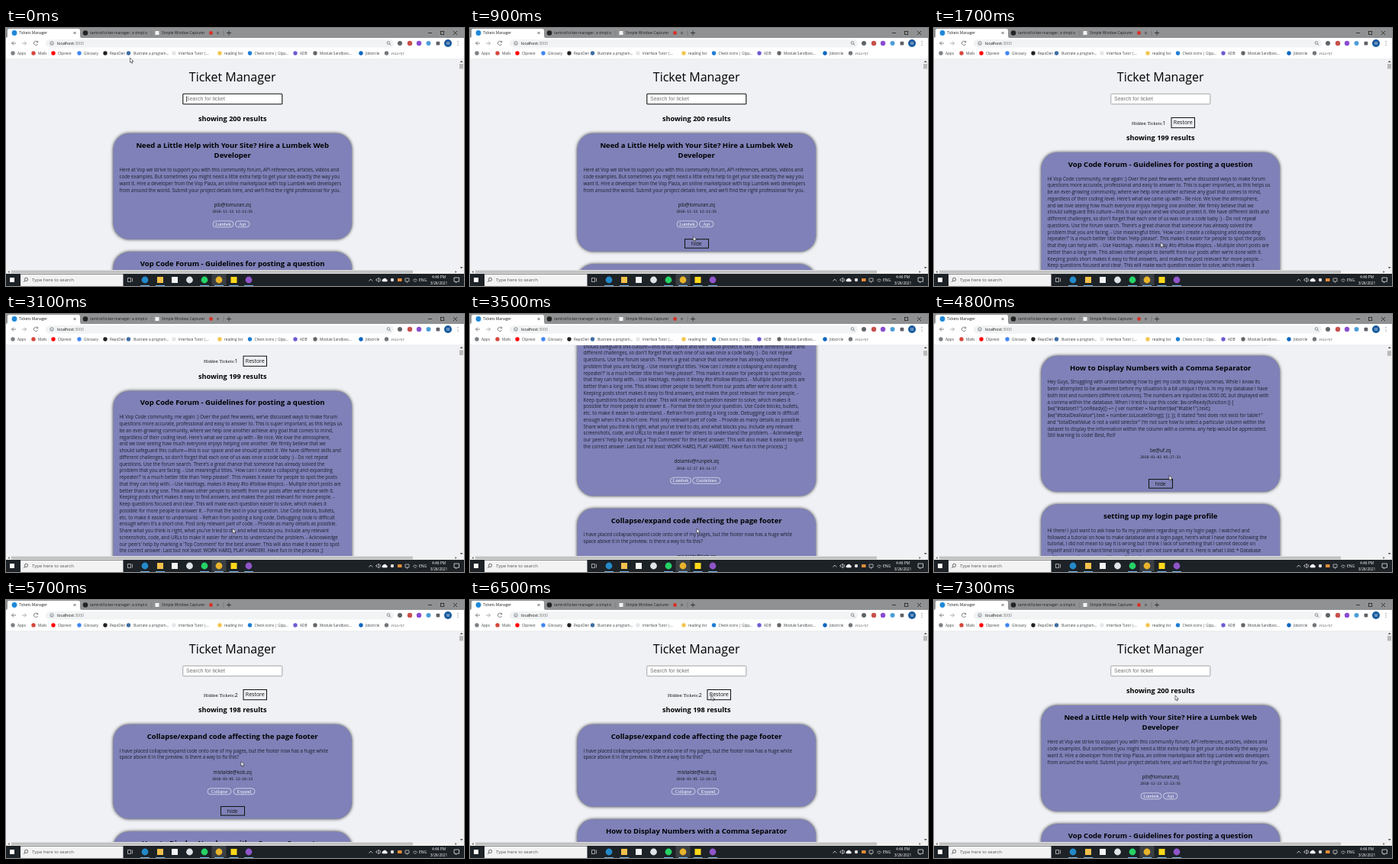
An HTML page that plays this animation: 600 px wide and 338 px high, repeating every 7.4 s.

```html
<!DOCTYPE html>
<html lang="en">
<head>
<meta charset="utf-8">
<title>Ticket Manager</title>
<style>
html, body { margin: 0; width: 100%; height: 100%; overflow: hidden; background: #eff1f5; }
svg { display: block; }
text { white-space: pre; font-family: "Open Sans", "Noto Sans", sans-serif; }
.bold { font-weight: 700; }
.serif { font-family: "Liberation Serif", serif; }
.mono { font-family: "DejaVu Sans Mono", monospace; }
.arial { font-family: "Liberation Sans", sans-serif; }
.hebrew { font-family: "DejaVu Sans", sans-serif; }
.card > rect:first-child { filter: drop-shadow(0 0 2px #333); }
</style>
</head>
<body>
<svg id="stage" width="100%" height="100%" viewBox="0 0 600 338"></svg>
<script>
const LOOP = 7400;
const CENTER = 296.7;
const LINE = 8.75;
const GAP = 16.5;

// Drawing helpers; text is placed by the middle of its line.
const text = (x, y, size, str, { fill = '#111', anchor = 'start', cls = '' } = {}) =>
  `<text x="${x}" y="${y + size * 0.35}" font-size="${size}" fill="${fill}" text-anchor="${anchor}" class="${cls}">${str}</text>`;
const middle = (y, size, str, cls = '', fill = '#111') => text(CENTER, y, size, str, { anchor: 'middle', cls, fill });
const rect = (x, y, w, h, fill, extra = '') =>
  `<rect x="${x}" y="${y}" width="${w}" height="${h}" fill="${fill}" ${extra}/>`;
const dot = (x, y, r, fill, extra = '') => `<circle cx="${x}" cy="${y}" r="${r}" fill="${fill}" ${extra}/>`;
const line = (d, stroke = '#5f6368', width = 0.8) =>
  `<path d="${d}" fill="none" stroke="${stroke}" stroke-width="${width}"/>`;

const tickets = [
  {
    title: ['Need a Little Help with Your Site? Hire a Lumbek Web', 'Developer'],
    body: `Here at Vop we strive to support you with this community forum, API references, articles, videos and
code examples. But sometimes you might need a little extra help to get your site exactly the way you
want it. Hire a developer from the Vop Plaza, an online marketplace with top Lumbek web developers
from around the world. Submit your project details here, and we'll find the right professional for you.`,
    email: 'pib@lomuran.zq', date: '2018-11-13 12:13:55',
    tags: [['Lumbek', 271, 27], ['Api', 300.5, 18.5]],
  },
  {
    title: ['Vop Code Forum - Guidelines for posting a question'],
    body: `Hi Vop Code community, me again :) Over the past few weeks, we've discussed ways to make forum
questions more accurate, professional and easy to answer to. This is super important, as this helps us
be an ever-growing community, where we help one another achieve any goal that comes to mind,
regardless of their coding level. Here's what we came up with - Be nice. We love the atmosphere,
and we love seeing how much everyone enjoys helping one another. We firmly believe that we
should safeguard this culture—this is our space and we should protect it. We have different skills and
different challenges, so don't forget that each one of us was once a code baby :) - Do not repeat
questions. Use the forum search. There's a great chance that someone has already solved the
problem that you are facing. - Use meaningful titles. 'How can I create a collapsing and expanding
repeater?' is a much better title than 'Help please!'. This makes it easier for people to spot the posts
that they can help with. - Use Hashtags. makes it #easy #to #follow #topics. - Multiple short posts are
better than a long one. This allows other people to benefit from our posts after we're done with it.
Keeping posts short makes it easy to find answers, and makes the post relevant for more people. -
Keep questions focused and clear. This will make each question easier to solve, which makes it
possible for more people to answer it. - Format the text in your question. Use Code blocks, bullets,
etc. to make it easier to understand. - Refrain from posting a long code. Debugging code is difficult
enough when it's a short one. Post only relevant part of code. - Provide as many details as possible.
Share what you think is right, what you've tried to do, and what blocks you. Include any relevant
screenshots, code, and URLs to make it easier for others to understand the problem. - Acknowledge
our peers' help by marking a 'Top Comment' for the best answer. This will also make it easier to spot
the correct answer. Last but not least: WORK HARD, PLAY HARDER!. Have fun in the process ;)`,
    email: 'dolamiv@runpek.zq', date: '2018-12-27 03:14:17',
    tags: [['Lumbek', 262.5, 27], ['Guidelines', 291.5, 36.5]],
  },
  {
    title: ['Collapse/expand code affecting the page footer'],
    body: `I have placed collapse/expand code onto one of my pages, but the footer now has a huge white
space above it in the preview. Is there a way to fix this?`,
    email: 'mivtalde@kob.zq', date: '2018-03-05 12:10:13',
    tags: [['Collapse', 264, 31], ['Expand', 298, 28]],
  },
  {
    title: ['How to Display Numbers with a Comma Separator'],
    body: `Hey Guys, Struggling with understanding how to get my code to display commas. While I know its
been attempted to be answered before my situation is a bit unique I think. In my my database I have
both text and numbers (different columns). The numbers are inputted as 0000.00, but displayed with
a comma within the database. When I tried to use this code: $w.onReady(function () {
$w("#dataset1").onReady(() => { var number = Number($w("#table1").text);
$w("#totalDealValue").text = number.toLocaleString(); }); }); It stated "text does not exist for table1"
and "totalDealValue is not a valid selector" I'm not sure how to select a particular column within the
dataset to display the information within the column with a comma. any help would be appreciated.
Still learning to code! Best, Rolf`,
    email: 'be@uf.zq', date: '2018-01-03 05:27:33', tags: [],
  },
  {
    title: ['setting up my login page profile'],
    body: `Hi there! I just want to ask how to fix my problem regarding on my login page. I watched and
followed a tutorial on how to make database and a login page, here's what I have done following the
tutorial, I did not mean to say it is wrong but I think I lack of something that I cannot decode on
myself and I have a hard time looking since I am not sure what it is. Here is what I did: * Database
settings, member page and the profile button.`,
    email: 'ruk@tamol.zq', date: '2018-02-11 08:41:20', tags: [],
  },
];

function buildCard(ticket, index) {
  const rows = ticket.body.split('\n');
  const bodyTop = 34.5 + (ticket.title.length - 1) * 13.6;
  const emailY = bodyTop + (rows.length - 1) * LINE + 19.5;
  const tagY = emailY + (ticket.tags.length ? 25 : 18);
  ticket.height = tagY + 20;
  const tags = ticket.tags.map(([name, x, w]) =>
    rect(x, tagY - 4, w, 8, 'none', 'rx="4" stroke="#fff" stroke-width=".6"') +
    text(x + w / 2, tagY, 6.2, name, { fill: '#fff', anchor: 'middle', cls: 'serif' })).join('');
  return `<g class="card" id="card${index}">
    ${rect(140.5, 0, 312.5, ticket.height, '#7f81b8', 'rx="21"')}
    ${ticket.title.map((t, i) => middle(15.5 + i * 13.6, 9.5, t, 'bold', '#000')).join('')}
    ${rows.map((r, i) => text(148.5, bodyTop + i * LINE, 6.2, r, { fill: '#1c1d2b' })).join('')}
    ${middle(emailY, 6.3, ticket.email)}
    ${middle(emailY + 9, 4.63, ticket.date, 'mono')}
    ${tags}
    <g class="hide">${rect(281.5, tagY + 19.8, 31, 11.6, 'none', 'stroke="#111"')}${middle(tagY + 25.6, 6.8, 'hide')}</g>
  </g>`;
}

function page() {
  return `<svg y="41" width="593" height="276" viewBox="0 41 593 276"><g id="scroller">
    ${middle(64.5, 16, 'Ticket Manager', '', '#000')}
    ${rect(231.8, 86.3, 130, 13.4, '#fff', 'id="search" rx="1"')}
    ${text(236, 93, 7.05, 'Search for ticket', { fill: '#757575', cls: 'arial' })}
    <g id="caret">${line('M236.5 89.5V97', '#000', 0.6)}</g>
    <g id="restoreRow">
      ${text(259, 124.5, 6.4, 'Hidden Tickets:', { cls: 'serif' })}
      <g id="hiddenCount">${text(299.4, 124, 7.4, '1')}</g>
      ${rect(311, 117.5, 30.5, 13.2, 'none', 'stroke="#111"')}
      ${text(326.3, 124, 7, 'Restore', { anchor: 'middle' })}
    </g>
    <g id="results">${middle(0, 9.16, 'showing 200 results', 'bold', '#000')}</g>
    ${tickets.map(buildCard).join('')}
  </g></svg>`;
}

function tabStrip() {
  const close = x => line(`M${x - 1.5} 5l3 3m0-3l-3 3`, '#333', 0.7);
  const tab = (x, str) => text(x, 6.5, 4.9, str, { fill: '#222' });
  return rect(0, 0, 600, 13, '#8f9193') +
    `<path d="M0 13Q2 13 2 10V3Q2 1 4 1H94Q97 1 97 3V10Q97 13 99 13Z" fill="#fff"/>` +
    dot(11, 6.5, 3.4, '#1e88d8') + tab(17, 'Tickets Manager') + close(90) +
    dot(104, 6.5, 3.3, '#222') + tab(110, 'tamirol/ticket-manager: a simpl') + close(183.5) +
    line('M191 3V10M285 3V10', '#666', 0.5) +
    rect(195.5, 4, 5, 5, '#f4f4f4') + tab(204, 'Simple Window Capturer') +
    dot(268.5, 6.5, 2.4, '#d93025') + close(277.5) +
    line('M292 3.5v6m-3-3h6', '#222') +
    line('M553 6.5h5M586 4l5 5m0-5l-5 5', '#111', 0.7) + rect(569.5, 4.3, 4.2, 4.2, 'none', 'stroke="#111" stroke-width=".7"');
}

function toolbar() {
  return rect(0, 13, 600, 28, '#fff') + rect(52, 15, 456, 10.4, '#f1f3f4', 'rx="5.2"') +
    line('M13 20H7.5M10 17.5L7.5 20l2.5 2.5') + line('M21 20h5.5M24 17.5l2.5 2.5-2.5 2.5', '#9a9da1') +
    line('M41.3 18.2A2.7 2.7 0 1 0 41.6 21M41.7 16.8v2h-2') +
    dot(60, 20, 2.3, 'none', 'stroke="#5f6368" stroke-width=".7"') + line('M60 19.6v1.7') +
    text(67, 20, 5.2, 'localhost<tspan fill="#777">:3000</tspan>') +
    dot(501, 19.5, 1.8, 'none', 'stroke="#5f6368" stroke-width=".7"') + line('M502.3 20.8l1.8 1.8') +
    dot(516, 20, 3, '#5f6368') + dot(529, 20, 3.2, '#c7504a') + dot(541, 20, 3.2, '#8a4bd0') +
    dot(553.5, 20, 3, '#4c9ed9') + rect(563.5, 17.7, 4.8, 4.8, '#5f6368', 'rx="1"') +
    dot(579, 20, 5, '#17599c') + text(579, 20, 4.6, 'M', { fill: '#fff', anchor: 'middle' }) +
    [17.5, 20, 22.5].map(y => dot(592, y, 0.6, '#5f6368')).join('');
}

function bookmarks() {
  const items = [
    ['#7d8185', 9, 'Apps'], ['#d6473b', 36, 'Mails'], ['#f00', 62, 'Clipnest'], ['#4285f4', 96, 'Glossary'],
    ['#222', 130, 'RepoDen'], ['#3f6f9f', 160.5, 'Illustrate a program...'], ['#e4e6e9', 220, 'Interface Tutor |...'],
    ['#f3c64e', 280, 'reading list'], ['#1c7ed6', 319.5, 'Check icons | Glyp...'], ['#6b5bd2', 379, 'ADB'],
    ['#666', 405, 'Module Sandbox:...'], ['#0a66c2', 465, 'Jobcircle'],
  ];
  return items.map(([color, x, label]) => dot(x, 33, 2.7, color) + text(x + 6, 33, 4.7, label, { fill: '#3c4043' })).join('') +
    dot(498.5, 33, 2.7, '#73777b') + text(505, 33, 4.6, 'דף-הבית', { fill: '#3c4043', cls: 'hebrew' }) +
    line('M0 40.7H600', '#d5d8dc', 0.5);
}

function scrollbars() {
  return rect(593, 41, 7, 276, '#f1f1f1') + `<path d="M594.7 45l2-2.3 2 2.3zM594.7 313l2 2.3 2-2.3z" fill="#555"/>` +
    rect(594, 47, 5, 6.5, '#b9b9b9', 'id="thumb"') +
    rect(0, 317, 600, 5, '#f1f1f1') + rect(7, 317.6, 526, 3.8, '#c1c1c1') +
    `<path d="M4.5 317.9v3.2l-2-1.6zM588.5 317.9v3.2l2-1.6z" fill="#555"/>`;
}

function taskbar() {
  const white = { fill: '#fff', anchor: 'middle' };
  const apps = [['#2489ca', 182], ['#f2c14c', 202], ['#f4f4f4', 221], ['#dfe4e8', 240.5], ['#25d366', 260], ['#e9b32b', 279], ['#ffd91a', 298.5], ['#8f55c9', 318]];
  const squares = [202, 221, 298.5];
  return rect(0, 322, 600, 16, '#1d2227') + rect(5, 327, 6, 6, '#fff') +
    rect(19, 322.5, 134.5, 15.5, '#f2f2f2') +
    dot(26.5, 329.4, 2.1, 'none', 'stroke="#333" stroke-width=".7"') + line('M25 331l-2 2', '#333', 0.7) +
    text(34, 330.2, 6, 'Type here to search', { fill: '#555' }) +
    line('M159.5 327.5h4v5h-4zM165.5 327.5v5', '#ddd', 0.7) +
    rect(269.5, 322, 19, 15, '#fff', 'opacity=".13"') +
    apps.map(([color, x]) => squares.includes(x) ? rect(x - 4, 326, 8, 8, color) : dot(x, 330, 4.4, color)).join('') +
    [182, 202, 260, 279, 298.5, 318].map(x => rect(x - 6, 337, 12, 1, '#76b9ed')).join('') +
    line('M475.5 331.5l2.3-2.5 2.3 2.5', '#fff', 0.7) +
    line('M485 329h1.5l2-2v6l-2-2h-1.5zM490 328q1.5 2 0 4', '#fff', 0.6) +
    `<path d="M493.5 332.3a1.7 1.7 0 0 1 .6-3.2 2.4 2.4 0 0 1 4.4.2 1.6 1.6 0 0 1 .3 3z" fill="#fff"/>` +
    dot(506, 330, 2.2, '#ddd') + rect(513, 328, 5.5, 4, '#e58c3a') +
    line('M523 328h5v4h-5zM525.5 332v1.8', '#fff', 0.6) + line('M533 331q3-4 6 0M534.5 332.5q1.5-2 3 0', '#fff', 0.6) +
    text(546, 330, 5, 'ENG', white) +
    text(567, 326.3, 4.8, '4:46 PM', white) +
    text(567, 334, 4.8, '3/26/2021', white) +
    line('M587 327h6.5v5.2h-2.5l-1.5 1.6v-1.6h-2.5z', '#fff', 0.7);
}

const stage = document.getElementById('stage');
stage.innerHTML = rect(0, 0, 600, 338, '#eff1f5') + page() + tabStrip() + toolbar() + bookmarks() + scrollbars() + taskbar() +
  `<path id="cursor" d="M0 0V6.2L1.4 5 2.4 7.2 3.4 6.8 2.5 4.6H4.4Z" fill="#fff" stroke="#222" stroke-width=".6"/>`;

const el = id => document.getElementById(id);
const show = (node, on) => node.setAttribute('display', on ? 'inline' : 'none');
const move = (node, x, y) => node.setAttribute('transform', `matrix(1 0 0 1 ${x} ${y})`);
const cards = tickets.map((ticket, i) => {
  const node = el('card' + i);
  return { node, height: ticket.height, box: node.querySelector('rect'), hide: node.querySelector('.hide') };
});
const countText = el('hiddenCount').firstChild;
const resultText = el('results').firstChild;

const linear = k => k;
const smooth = k => k * k * (3 - 2 * k);
function track(keys, t, ease) {
  const next = keys.findIndex(k => k[0] > t);
  if (next < 0) return keys[keys.length - 1].slice(1);
  if (next === 0) return keys[0].slice(1);
  const [a, b] = [keys[next - 1], keys[next]];
  const k = ease((t - a[0]) / (b[0] - a[0]));
  return a.slice(1).map((v, i) => v + (b[i + 1] - v) * k);
}

const cursorKeys = [[0, 162.5, 39], [100, 162.5, 39], [1000, 297, 281], [3500, 297, 281], [3900, 301, 199.5],
  [4300, 301, 199.5], [4700, 308, 211.5], [5900, 308, 211.5], [6500, 316, 125]];
const scrollKeys = [[2940, 0], [3100, 62], [3600, 232.5], [5000, 232.5], [5600, 0]];
const FIRST_HIDE = 1400, SECOND_HIDE = 4200, RESTORE = 6700;

function render(t) {
  const [cx, cy] = track(cursorKeys, t, smooth);
  const [scroll] = track(scrollKeys, t, linear);
  const hidden = t >= RESTORE ? 0 : (t >= FIRST_HIDE) + (t >= SECOND_HIDE);
  const focused = t < FIRST_HIDE;
  const shift = hidden ? 25 : 0;

  move(el('cursor'), cx, cy);
  move(el('scroller'), 0, -scroll);
  move(el('thumb'), 0, scroll / 180);
  el('search').setAttribute('stroke', focused ? '#111' : '#858585');
  el('search').setAttribute('stroke-width', focused ? 1.1 : 0.7);
  show(el('caret'), focused && t % 1000 < 500);
  show(el('restoreRow'), hidden > 0);
  countText.textContent = hidden;
  resultText.textContent = `showing ${200 - hidden} results`;
  move(el('results'), 0, 118.8 + shift);

  let top = 138 + shift;
  cards.forEach(({ node, height, box, hide }, i) => {
    show(node, i >= hidden);
    if (i < hidden) return;
    const pointer = cy + scroll - top;
    const hovered = cy > 41 && cx > 140 && cx < 453 && pointer > 0 && pointer < height + 16;
    const fullHeight = height + (hovered ? 16 : 0);
    move(node, 0, top);
    box.setAttribute('height', fullHeight);
    show(hide, hovered);
    top += fullHeight + GAP;
  });
}

const start = performance.now();
function tick() {
  render((performance.now() - start) % LOOP);
  requestAnimationFrame(tick);
}
tick();
</script>
</body>
</html>
```
